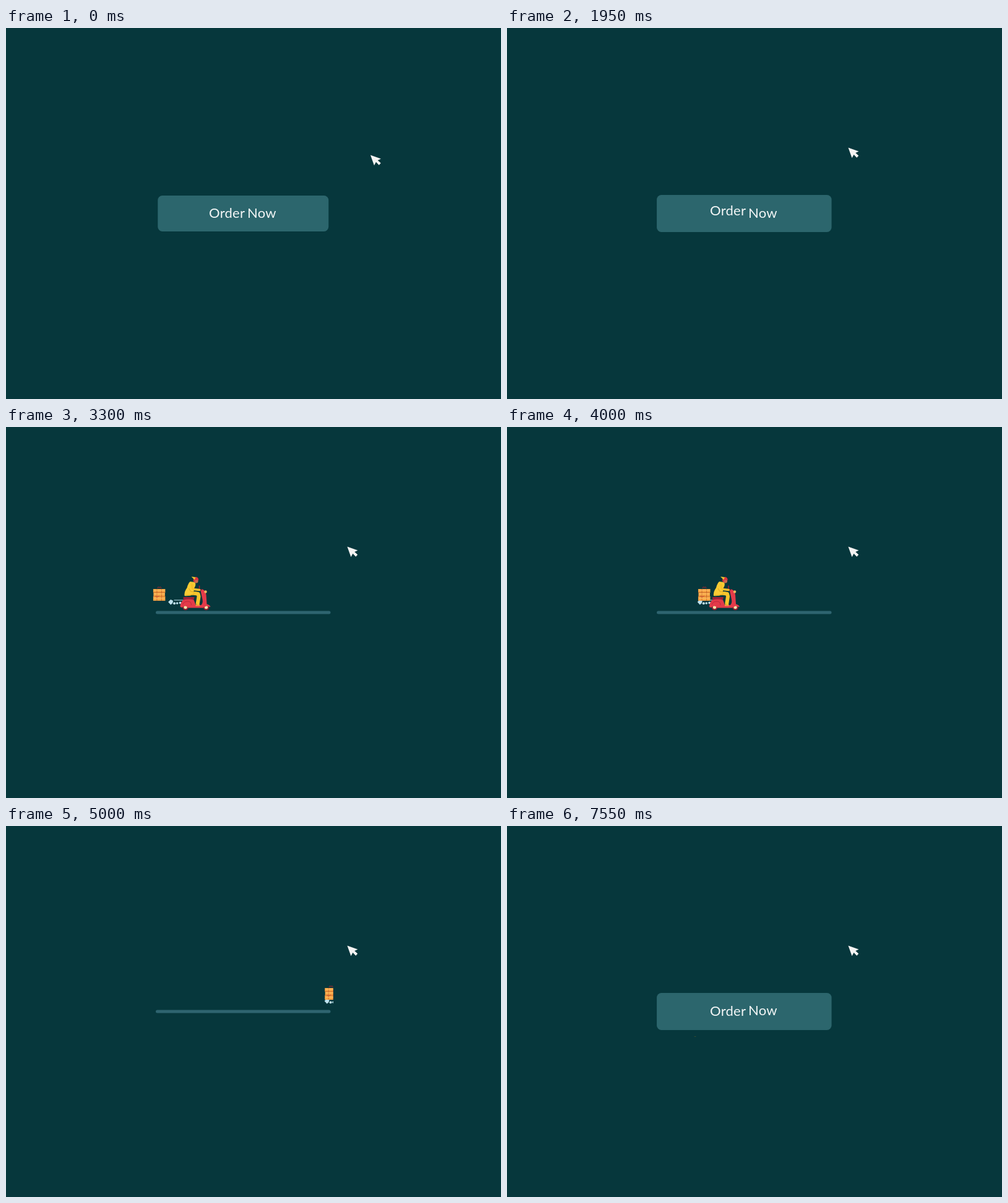
An HTML page that plays this animation: 800x600 px, repeating every 8150 ms.

```html
<!DOCTYPE html>
<html lang="en">
<head>
<meta charset="utf-8">
<title>Order button</title>
<style>
  html, body { margin: 0; width: 100%; height: 100%; overflow: hidden; background: #06373c; }
  svg { display: block; }
  text { font: 400 22px Lato, "Open Sans", sans-serif; letter-spacing: .25px; fill: #f3f6f6; }
</style>
</head>
<body>
<svg width="800" height="600" viewBox="0 0 800 600">
  <defs>
    <clipPath id="labelWindow"><rect x="220" y="267" width="320" height="74"/></clipPath>
    <clipPath id="road"><rect x="220" y="235" width="309" height="63"/></clipPath>
  </defs>

  <rect id="button" fill="#2c666d"/>

  <g clip-path="url(#labelWindow)">
    <text id="order" x="328" y="307">Order</text>
    <text id="now" x="390" y="307">Now</text>
    <g id="done">
      <circle cx="304" cy="299" r="10.2" fill="#ffa60a"/>
      <path d="M299.5 299.5l3 3 6-6.3" fill="none" stroke="#2c666d" stroke-width="1.5"/>
      <text x="325" y="308">Completed</text>
    </g>
  </g>

  <!-- Scooter and boxes: x is measured from the scooter's back edge -->
  <g clip-path="url(#road)">
    <g id="scooter">
      <path d="M-9 280H6" stroke="#9fc4cd" stroke-width="1.2"/>
      <g id="smoke" fill="#bfe3ef">
        <path d="M-18 283l4-4 4 2-1 4-3 2.500z"/>
        <circle cx="-8" cy="285.300" r="2"/>
        <circle cx="-3.500" cy="285" r="1.800"/>
        <circle cx="1.500" cy="284.300" r="1.900"/>
      </g>
      <g fill="#8f1f32" stroke="none">
        <circle cx="9.500" cy="291.500" r="4.800"/>
        <circle cx="43" cy="291.500" r="4.800"/>
      </g>
      <g fill="#f8dfa8">
        <circle cx="9.500" cy="291.500" r="2.700"/>
        <circle cx="43" cy="291.500" r="2.700"/>
      </g>
      <path d="M6 275h18l-1 4H6z" fill="#9c2138"/>
      <path d="M1 291q0-7 5-11.500 9-2 17 0 2 5 3 8.500h9q3-3 2-9l-3-14q0-3 3-2.500 5 2 6 9l1 15q5 1 6 4.500l-7-1.500-5 3H14q-2-3-5-3-3 0-5 2.500z" fill="#e33a49"/>
      <path d="M5 287q2-5 8-5 6 0 6 6" fill="none" stroke="#ba2a3d"/>
      <circle cx="42" cy="266.500" r="2.200" fill="#f6b45c"/>
      <path d="M30 262.500l6 1M32 256.500v5" stroke="#9c2138" stroke-width="1.600"/>
      <path d="M14 270q9-2 16 0l1 4-2 13" fill="none" stroke="#f7c52c" stroke-width="6" stroke-linejoin="round"/>
      <path d="M26 287h6.500v2.500H26z" fill="#f2a03a"/>
      <path d="M8 273q-1-6 4-13 2-8 5-10l8 1q2 5-1 9l-2 10q-6 4-14 3z" fill="#f9cb34"/>
      <path d="M20 255q0 6 3 7.500l9 1" fill="none" stroke="#f7c02a" stroke-width="3.600" stroke-linecap="round"/>
      <path d="M15 261l3 5 6 1M10 272q8 1 14-2" fill="none" stroke="#d99a1c" stroke-width=".8"/>
      <circle cx="26.500" cy="249" r="3.600" fill="#c96a4c"/>
      <path d="M22 249q0-6 5-6.500 4 1 3.500 5.500l-5-1-1 4z" fill="#dc3340"/>
      <path d="M19 242l7 1-2 4z" fill="#f7c52c"/>
    </g>
    <g id="boxes">
      <path d="M7 261q1-4 3-1 2-3 3 1" fill="none" stroke="#7e2c33" stroke-width="1.200"/>
      <path d="M0 262h19.500v5.500H0zM.5 267.500h18.500v6.500H.5zM0 274h19.500v7H0z" fill="#f7a544"/>
      <path d="M0 267.500h19.500M0 274h19.500M6 262v19M13.500 262v19" stroke="#c96a2e" stroke-width=".9"/>
      <path d="M1 264h18M1 270h18M1 277h18" stroke="#ffc46c"/>
      <path d="M3 273l3 2 4-2" fill="none" stroke="#c64b34"/>
    </g>
  </g>

  <path id="cursor" d="M0 .5L17 6.500 11.800 9 16.800 13.600 13.800 16.800 9 11.800 6 17.300z" fill="#f4f3f2"/>
</svg>

<script>
const LOOP = 8150;
const el = id => document.getElementById(id);
const ease = p => p < .5 ? 2 * p * p : 1 - 2 * (1 - p) ** 2;

// Eased value along a list of time, value, time, value, ...
function track(t, ...keys) {
  if (t <= keys[0]) return keys[1];
  for (let i = 2; i < keys.length; i += 2) {
    const [t0, v0, t1, v1] = keys.slice(i - 2, i + 2);
    if (t < t1) return v0 + (v1 - v0) * ease((t - t0) / (t1 - t0));
  }
  return keys[keys.length - 1];
}

const move = (id, x, y = 0) => el(id).setAttribute("transform", `translate(${x} ${y})`);

function drawButton(t) {
  const hover = track(t, 950, 0, 1250, 1);
  const flat = track(t, 2650, 0, 3000, 1, 5200, 1, 5550, 0);
  const w = 276 + 6.5 * hover;
  const h = (58 + 2 * hover) * (1 - flat) + 5 * flat;
  const box = { x: 383.3 - w / 2, y: 300 - h / 2, width: w, height: h, rx: Math.min(7.5, h / 2) };
  for (const name in box) el("button").setAttribute(name, box[name]);
  el("button").setAttribute("fill", flat > .9 ? "#2e6470" : "#2c666d");
}

function draw(t) {
  drawButton(t);

  move("order", 0, track(t, 1850, 0, 2330, -42, 6900, -42, 7400, -.5));
  move("now", 0, track(t, 1970, 0, 2450, -42, 7020, -42, 7550, -1));
  move("done", 0, track(t, 5450, -50, 5900, 0, 6000, 0, 6450, 52));

  const x = track(t, 2900, 170, 3320, 281, 4000, 326, 4400, 290, 5150, 553);
  move("scooter", x);
  move("boxes", x - 17 - track(t, 3150, 52, 3450, 0));
  move("smoke", Math.sin(t / 60) * .4);

  move("cursor",
    track(t, 600, 589, 1300, 452, 1500, 452, 1920, 551.5),
    track(t, 600, 205, 1300, 287, 1500, 287, 1920, 193));
}

const start = performance.now();
function tick() {
  draw((performance.now() - start) % LOOP);
  requestAnimationFrame(tick);
}
tick();
</script>
</body>
</html>
```
